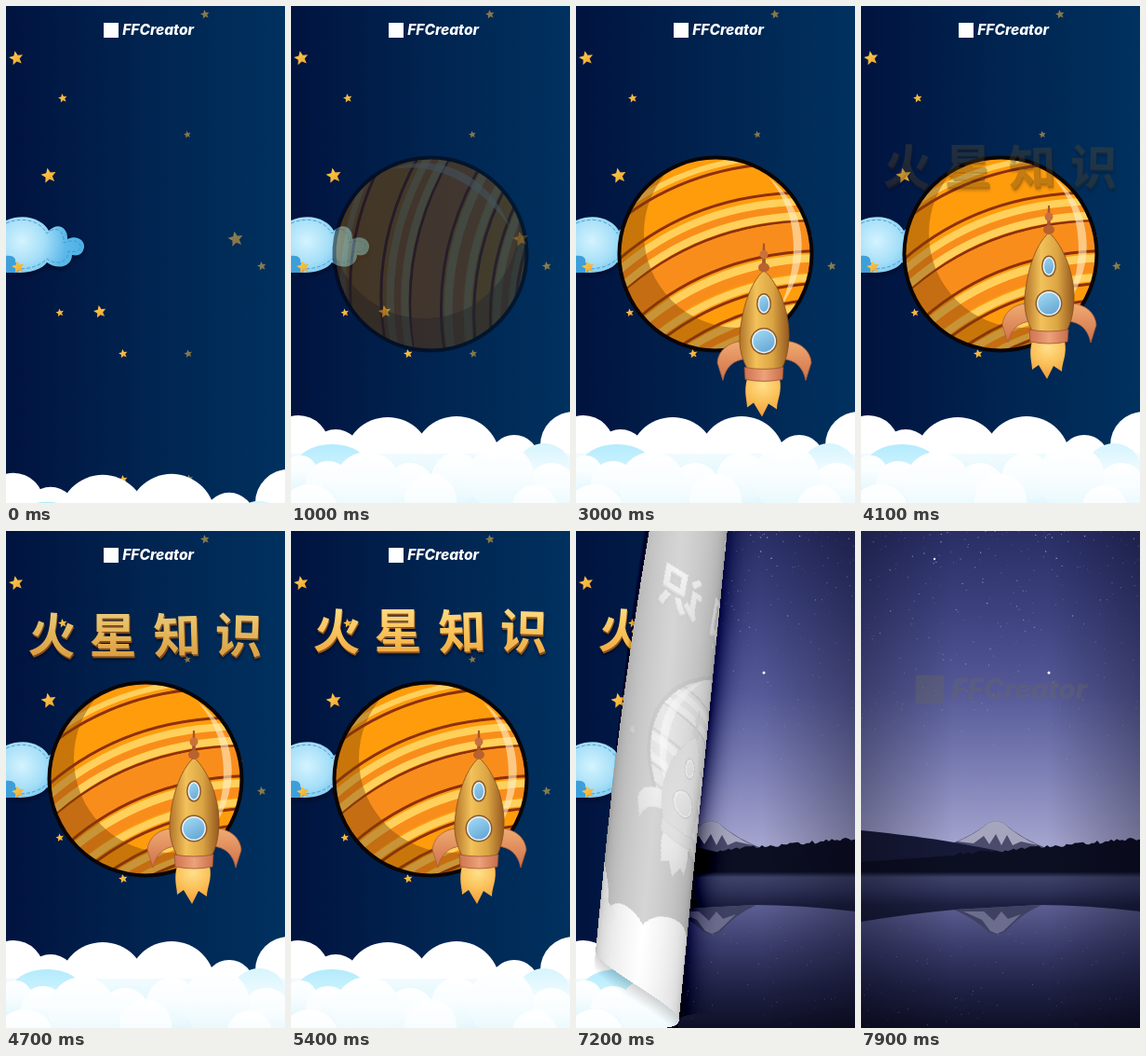
These frames come from a looping animation (300x533 px, 8 s). An HTML page with a canvas:

```html
<!DOCTYPE html>
<html lang="zh">
<head>
<meta charset="utf-8">
<style>
  html, body { margin: 0; width: 100%; height: 100%; overflow: hidden; background: #011a49; }
  canvas { display: block; width: 300px; height: 533px; }
</style>
</head>
<body>
<script>
const W = 300, H = 533, LOOP = 8000, TAU = Math.PI * 2;

function makeLayer() {
  const canvas = document.createElement('canvas');
  canvas.width = W;
  canvas.height = H;
  return canvas.getContext('2d', { willReadFrequently: true });
}
const stage = makeLayer(), layer = makeLayer(), backdrop = makeLayer(), night = makeLayer();
document.body.append(stage.canvas);

// ---------- helpers ----------
const clamp = v => Math.max(0, Math.min(1, v));
const easeOut = (t, start, length, power = 2) => 1 - (1 - clamp((t - start) / length)) ** power;

function disc(g, x, y, rx, fill, ry = rx) {
  g.fillStyle = fill;
  g.beginPath();
  g.ellipse(x, y, rx, ry, 0, 0, TAU);
  g.fill();
}
function shape(g, d, fill, stroke, width = 1) {
  const path = new Path2D(d);
  if (fill) { g.fillStyle = fill; g.fill(path); }
  if (stroke) { g.strokeStyle = stroke; g.lineWidth = width; g.stroke(path); }
}
function addStops(fill, stops) {
  stops.forEach((s, i) => Array.isArray(s) ? fill.addColorStop(...s) : fill.addColorStop(i / (stops.length - 1), s));
  return fill;
}
const gradient = (g, x0, y0, x1, y1, ...stops) => addStops(g.createLinearGradient(x0, y0, x1, y1), stops);
const glow = (g, x, y, r, ...stops) => addStops(g.createRadialGradient(x, y, 0, x, y, r), stops);

function random(seed) {
  return () => (seed = (seed * 16807) % 2147483647) / 2147483647;
}
// Fading parts are darkened as well as transparent.
function fadeIn(g, alpha, draw) {
  if (alpha <= 0) return;
  layer.clearRect(0, 0, W, H);
  layer.save();
  draw(layer);
  layer.restore();
  layer.globalCompositeOperation = 'source-atop';
  layer.fillStyle = `rgba(0,0,0,${1 - alpha})`;
  layer.fillRect(0, 0, W, H);
  layer.globalCompositeOperation = 'source-over';
  g.globalAlpha = alpha;
  g.drawImage(layer.canvas, 0, 0);
  g.globalAlpha = 1;
}

function logo(g, x, y, scale) {
  g.save();
  g.translate(x, y);
  g.scale(scale, scale);
  g.fillStyle = '#fff';
  g.fillRect(-48, -8, 16, 16);
  g.font = 'italic 800 15.5px Inter, sans-serif';
  g.textAlign = 'right';
  g.fillText('FFCreator', 49, 5);
  g.restore();
}

// ---------- space scene ----------
function star(g, x, y, r) {
  g.globalAlpha = x > 190 ? 0.55 : 1;
  g.beginPath();
  for (let i = 0; i < 10; i++) {
    const angle = i * TAU / 10 - 1.75, d = i % 2 ? r * 0.46 : r;
    g.lineTo(x + d * Math.cos(angle), y + d * Math.sin(angle));
  }
  g.fillStyle = gradient(g, x - r, y - r, x + r, y + r, '#ffd257', '#ee9f24');
  g.fill();
  g.globalAlpha = 1;
}

function drawBackdrop(g) {
  g.fillStyle = gradient(g, 0, 0, W, 0, '#01133f', '#012450', '#00315f');
  g.fillRect(0, 0, W, H);
  const puffs = 'M0 230C22 221 40 230 46 241C56 231 67 238 66 250C77 245 85 252 84 259C82 268 76 268 71 267C71 279 56 284 44 275C36 286 14 288 0 284Z';
  g.save();
  g.shadowColor = 'rgba(0,0,20,.5)';
  g.shadowBlur = 5;
  g.shadowOffsetY = 3;
  shape(g, puffs, glow(g, 17, 252, 72, '#d4f3ff', '#a6dff8', '#5cb8ea', '#4aaee6'));
  g.restore();
  g.setLineDash([4, 2]);
  shape(g, 'M0 233C22 224 38 233 44 244C54 234 63 242 62 254C74 249 81 254 80 259C78 264 73 264 67 263C67 275 55 279 44 271C34 282 14 284 0 280', null, '#3b93c6', 0.8);
  g.setLineDash([]);
  shape(g, 'M0 268C8 267 11 271 10 275C19 276 17 285 9 286H0Z', '#3d9fda');
  [[11, 56, 8], [61, 99, 5], [214, 9, 5], [195, 138, 4], [46, 182, 8.5], [247, 250, 8.5], [275, 279, 5],
   [13, 280, 7], [58, 329, 4.5], [101, 328, 7], [126, 373, 5], [196, 373, 4.5], [126, 508, 5], [197, 507, 4.5]]
    .forEach(s => star(g, ...s));
}

function drawClouds(g) {
  [[8, 472, 33], [48, 482, 28], [104, 488, 47], [178, 487, 47], [240, 487, 27], [304, 471, 36]]
    .forEach(([x, y, r]) => disc(g, x, y, r, '#fff'));
  g.fillStyle = gradient(g, 0, 455, 0, H, '#fff', '#e9f9fe', '#e4f7fd');
  g.fillRect(0, 480, W, 120);
  disc(g, 44, 494, 39, gradient(g, 0, 470, 0, 494, '#b4ebfd', '#cbf2fe'), 24);
  disc(g, 272, 494, 28, gradient(g, 0, 468, 0, 494, '#d5f4fd', '#ecfaff'), 25);
  for (const [x, y, r] of [[178, 506, 27], [128, 516, 26], [10, 500, 18], [40, 512, 24], [280, 516, 26],
                           [82, 514, 36], [226, 506, 36], [150, 530, 28], [262, 538, 24], [20, 545, 32]])
    disc(g, x, y, r, gradient(g, 0, y - r, 0, y + r, '#fff', '#f8fdff', '#e6f8fd'));
}

function drawPlanet(g, angle) {
  const R = 103.5, yellow = '#ffd05c', brown = '#8d300a', amber = '#f98d1c';
  g.translate(150, 266);
  g.rotate(angle);
  g.beginPath();
  g.arc(0, 0, R, 0, TAU);
  g.save();
  g.clip();
  g.fillStyle = '#ff9c0c';
  g.fillRect(-R, -R, 2 * R, 2 * R);
  g.save();
  g.rotate(-0.34);
  for (const [y, width, color] of [
    [-91, 6, yellow], [-83, 3, brown], [-49, 3, brown], [-39, 8, yellow], [-31, 7, amber], [-23, 8, yellow],
    [-17, 3, brown], [0, 31, amber], [17, 3, brown], [25, 9, yellow], [35, 11, amber], [46, 8, yellow],
    [53, 3, brown], [71, 3, brown], [78, 8, yellow], [86, 7, amber], [93, 6, yellow], [98, 3, brown]])
    shape(g, `M-115 ${y + 26}Q-5 ${y - 23} 115 ${y + 20}`, null, color, width);
  g.restore();
  g.beginPath();
  g.arc(0, 0, R + 2, 0, TAU);
  g.arc(24, -22, 101, 0, TAU, true);
  g.fillStyle = 'rgba(125,65,5,.42)';
  g.fill();
  shape(g, 'M57 -82C98 -52 106 10 69 58C91 10 90 -44 57 -82Z', 'rgba(255,240,200,.6)');
  g.restore();
  g.beginPath();
  g.arc(0, 0, R, 0, TAU);
  g.strokeStyle = '#0b0506';
  g.lineWidth = 4;
  g.stroke();
}

function drawRocket(g, dy) {
  g.save();
  g.translate(0, dy);
  shape(g, 'M184 359C180 374 184 382 184 390L191 385L200 400L207 386L216 392C216 382 222 374 219 359Z',
    glow(g, 201, 366, 34, '#ffe08a', '#fbc25a', '#f09c38'));
  const fin = gradient(g, 0, 318, 0, 360, '#f0ad72', '#d2714b');
  shape(g, 'M178 319C164 320 153 329 152 342L158 361C161 346 170 339 183 338Z', fin, '#a9603a', 0.8);
  shape(g, 'M227 319C241 320 252 329 253 342L247 361C244 346 235 339 222 338Z', fin, '#a9603a', 0.8);
  shape(g, 'M202 243C219 258 230 290 229 316C228 334 224 344 220 350H185C179 340 175 326 176 313C178 287 186 258 202 243Z',
    gradient(g, 176, 0, 229, 0, '#b2742a', '#f3c25a', '#dba443', '#94591f'), '#835019', 0.8);
  shape(g, 'M181 347Q202 351 223 347L222 360Q202 364 182 360Z',
    gradient(g, 181, 0, 224, 0, '#cf7350', '#eda27a', '#c66b48'), '#9a5234', 0.8);
  shape(g, 'M201 214H203L204 236H200Z', '#a6562f');
  disc(g, 202, 226, 4.5, '#c8713d');
  disc(g, 202, 240, 6, '#b7622f', 5);
  for (const [y, rx, ry] of [[279, 8, 11.5], [319, 14.5, 14.5]]) {
    disc(g, 202, y, rx, '#8b5a2b', ry);
    disc(g, 202, y, rx - 1.5, '#e9f4fa', ry - 1.5);
    disc(g, 202, y, rx - 3, gradient(g, 194, y - ry, 210, y + ry, '#a5def5', '#5d9fd0'), ry - 3);
  }
  g.restore();
}

function drawTitle(g, dy) {
  g.font = '700 51px "Noto Sans CJK SC", "Noto Sans CJK", sans-serif';
  g.textAlign = 'center';
  g.textBaseline = 'middle';
  [...'火星知识'].forEach((glyph, i) => {
    g.save();
    g.translate([50, 115, 184, 250][i], 107 + dy);
    g.rotate([0.07, 0, -0.03, 0.03][i]);
    g.shadowColor = 'rgba(0,0,0,.55)';
    g.shadowBlur = 3;
    g.shadowOffsetY = 2;
    g.fillStyle = '#8f5320';
    g.fillText(glyph, 1, 2);
    g.shadowColor = 'transparent';
    g.fillStyle = gradient(g, 0, -24, 0, 24, '#ffdb83', '#fac45c', '#f0ac45');
    g.fillText(glyph, 0, 0);
    g.restore();
  });
}

function drawSpace(g, t) {
  g.drawImage(backdrop.canvas, 0, 0);
  g.save();
  g.translate(0, 62 * (1 - easeOut(t, 0, 850)));
  drawClouds(g);
  g.restore();
  const spin = easeOut(t, 700, 1000);
  fadeIn(g, spin, l => drawPlanet(l, -TAU / 3 * (1 - spin)));
  if (t > 2400) drawRocket(g, 325 * (1 - easeOut(t, 2400, 1200, 3)));
  const rise = easeOut(t, 3906, 1000);
  fadeIn(g, rise, l => drawTitle(l, 100 * (1 - rise)));
  logo(g, 153, 26, 1);
}

// ---------- lake scene ----------
function drawNight(g) {
  const rnd = random(77);
  g.fillStyle = gradient(g, 0, 0, 0, 345, '#292e66', '#3d427f', '#555997', '#7d80b5', '#a9a8d2');
  g.fillRect(0, 0, W, 370);
  for (let i = 0; i < 420; i++) {
    const y = rnd() ** 1.5 * 290;
    disc(g, rnd() * W, y, 0.25 + rnd() * 0.5, `rgba(225,228,255,${(0.2 + rnd() * 0.6) * (1 - y / 330)})`);
  }
  disc(g, 79, 30, 1.2, '#fff');
  disc(g, 202, 152, 1.5, '#fff');
  shape(g, 'M98 335Q121 326 137 313L145 311L153 313Q172 330 204 342V352H98Z', '#4b4c6c');
  shape(g, 'M104 333Q123 325 137 313L145 311L153 313Q168 327 190 337L172 333L163 337L157 326L151 337L145 325L138 336L132 327L121 335Z', '#a5a5bd');
  shape(g, 'M0 321Q60 327 100 334T160 346V370H0Z', '#171a37');
  let trees = 'M0 355L100 348';
  for (let x = 104; x <= 302; x += 3) trees += `L${x} ${349 - (x - 100) * 0.085 - rnd() * 4}`;
  shape(g, trees + 'V371H0Z', '#0c0e22');
  g.fillStyle = gradient(g, 0, 366, 0, 420, [0, '#10132b'], [0.1, '#3d4268'], [0.3, '#343860'], [0.65, '#1c1f3f'], [1, '#171a37']);
  g.fillRect(0, 366, W, H - 366);
  shape(g, 'M0 419Q55 410 102 406L192 401Q240 401 300 408V533H0Z',
    gradient(g, 0, 402, 0, H, '#5b5e91', '#3a3c6b', '#202246', '#0e0f25'));
  shape(g, 'M100 406Q123 416 137 430L146 433L155 430Q170 412 194 401Z', '#3f4163');
  shape(g, 'M110 408L130 417L139 429L146 432L153 429L172 411L158 416L151 408L143 418L132 408Z', '#6c6d8d');
  for (let i = 0; i < 90; i++)
    disc(g, rnd() * W, 425 + rnd() * 105, 0.35, `rgba(190,195,240,${0.15 + rnd() * 0.4})`, 0.6);
  g.fillStyle = gradient(g, 0, 0, W, 0, 'rgba(0,0,12,.3)', 'rgba(0,0,12,0)', 'rgba(0,0,12,0)', 'rgba(0,0,12,.3)');
  g.fillRect(0, 0, W, H);
}

function drawLake(g, t) {
  g.drawImage(night.canvas, 0, 0);
  fadeIn(g, clamp((t - 7500) / 1000), l => logo(l, 150, 170, 1.9));
}

// ---------- page curl around a moving cylinder ----------
function curl(from, to, progress) {
  const amount = progress * 1.66 - 0.16, R = 1 / TAU, turn = TAU * amount;
  const C = Math.cos(TAU * 100 / 360), S = Math.sin(TAU * 100 / 360);
  const result = stage.createImageData(W, H), out = result.data;
  let qx, qy;
  const inside = () => qx >= 0 && qy >= 0 && qx <= 1 && qy <= 1;
  const hit = (X, angle) => {
    const d = angle / TAU;
    qx = C * X - S * d + 0.985;
    qy = S * X + C * d + 0.985;
  };
  const sample = () => (Math.min(H - 1, Math.floor(qy * H)) * W + Math.min(W - 1, Math.floor(qx * W))) * 4;
  const put = (i, src, j, shade = 0) => {
    for (let k = 0; k < 3; k++) out[i + k] = src[j + k] - shade * 255;
  };
  const seeThrough = (i, X, yc, shade) => {
    if (yc > 0) return put(i, from, i, shade);
    hit(X, Math.PI - Math.acos(yc / R) + turn);
    if (inside()) put(i, from, sample(), shade);
    else put(i, to, i, shade);
  };
  for (let y = 0, i = 0; y < H; y++) for (let x = 0; x < W; x++, i += 4) {
    const u = (x + 0.5) / W, v = (y + 0.5) / H;
    const X = C * u + S * v - 0.801, yc = C * v - S * u + 0.89 - amount;
    out[i + 3] = 255;
    if (yc > R) { put(i, from, i); continue; }
    if (yc < -R) {
      const mirror = -2 * R - yc;
      let shade = 0;
      if (mirror < 0) {
        const angle = Math.acos(mirror / R) + turn - Math.PI;
        hit(X, angle);
        if (inside() && (angle < Math.PI || amount > 0.5))
          shade = (1 - Math.hypot(qx - 0.5, qy - 0.5) / 0.71) * (-mirror / R) ** 3 * 0.5;
      }
      put(i, to, i, shade);
      continue;
    }
    const angle = Math.acos(yc / R) + turn - Math.PI, wrapped = (angle % TAU + TAU) % TAU;
    if ((wrapped > Math.PI && amount < 0.5) || (wrapped > Math.PI / 2 && amount < 0)) {
      seeThrough(i, X, yc, 0);
      continue;
    }
    hit(X, angle);
    if (inside()) {
      const j = sample();
      const gray = (from[j] + from[j + 1] + from[j + 2]) / 15 + 204 * ((1 - Math.abs(yc / R)) ** 0.2 / 2 + 0.5);
      out[i] = out[i + 1] = out[i + 2] = gray;
    } else {
      const gap = Math.hypot(Math.max(-qx, qx - 1, 0), Math.max(-qy, qy - 1, 0));
      seeThrough(i, X, yc, Math.max(0, (1 - gap * 30) / 3 * amount));
    }
  }
  stage.putImageData(result, 0, 0);
}

// ---------- playback ----------
const pixels = () => stage.getImageData(0, 0, W, H).data;
const begin = performance.now();

function render() {
  const t = (performance.now() - begin) % LOOP;
  const turn = (t - 6530) / 1650;
  if (turn < 0.8) drawSpace(stage, t);
  if (turn > 0) {
    const from = turn < 0.8 && pixels();
    drawLake(stage, t);
    if (from) curl(from, pixels(), turn);
  }
  requestAnimationFrame(render);
}
drawBackdrop(backdrop);
drawNight(night);
render();
</script>
</body>
</html>
```
